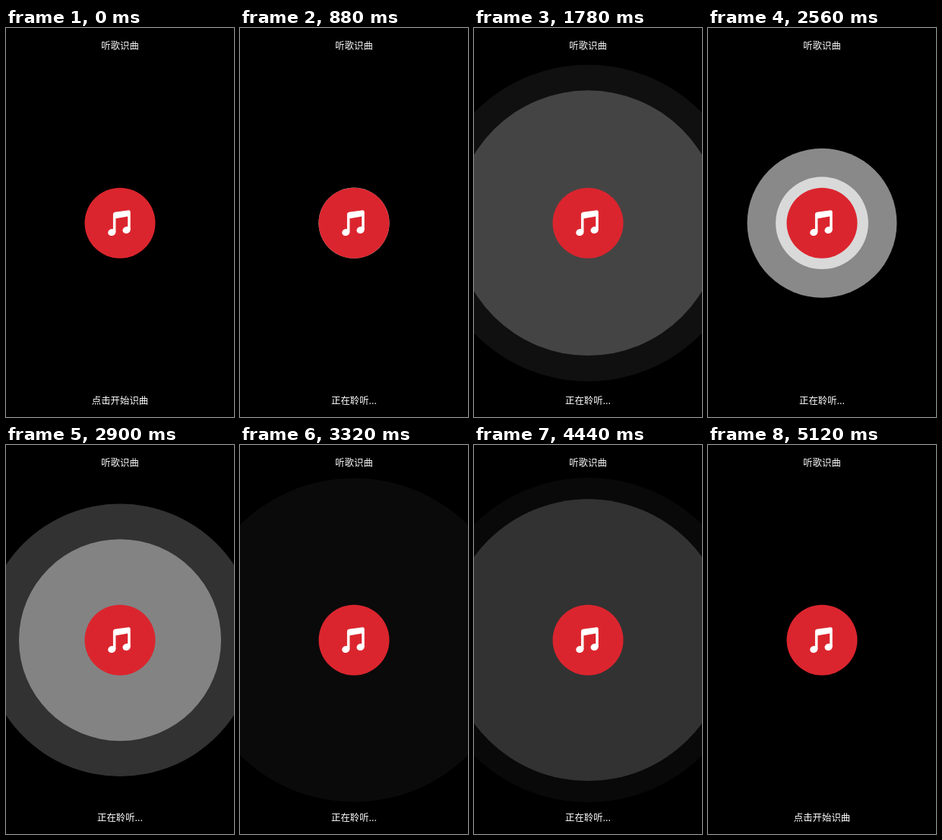
These frames come from a looping animation (300x513 px, 5200 ms). An HTML page with a canvas:

```html
<!DOCTYPE html>
<html lang="zh-CN">
<head>
<meta charset="utf-8">
<style>
  html, body { margin: 0; width: 100%; height: 100%; overflow: hidden; background: #000; }
  #stage { position: relative; width: 300px; height: 513px; overflow: hidden; }
  canvas { position: absolute; left: 0; top: 0; }
  .label {
    position: absolute; left: 0; width: 300px; text-align: center; color: #fff;
    font: 12.4px/20px "Noto Sans CJK SC", "Noto Sans CJK", sans-serif; white-space: nowrap;
  }
  #title { top: 13px; }
  #hint { top: 481px; }
</style>
</head>
<body>
<div id="stage">
  <canvas id="view" width="300" height="513"></canvas>
  <div class="label" id="title">听歌识曲</div>
  <div class="label" id="hint">点击开始识曲</div>
</div>
<script>
  const LOOP = 5200;
  const CX = 150, CY = 257.2;
  const BUTTON = 46.5, REACH = 218.5;
  const GROW = 1080, DELAY = 198;
  const WAVES = [866, 2161, 3473];
  const LISTEN_FROM = 860, LISTEN_TO = 4750;

  const ctx = document.getElementById('view').getContext('2d');
  const hint = document.getElementById('hint');
  const ease = u => 0.5 - Math.cos(Math.PI * u) / 2;

  function disc(r, color) {
    ctx.fillStyle = color;
    ctx.beginPath();
    ctx.arc(CX, CY, r, 0, Math.PI * 2);
    ctx.fill();
  }

  function ripple(age) {
    if (age <= 0 || age >= GROW) return;
    const p = ease(age / GROW);
    const alpha = 0.735 - 0.72 * p + 0.1 * p * (1 - p);
    disc(BUTTON + (REACH - BUTTON) * p, `rgba(255,255,255,${alpha})`);
  }

  function head(x, y) {
    ctx.beginPath();
    ctx.ellipse(x, y, 5.2, 4.5, -0.35, 0, Math.PI * 2);
    ctx.fill();
  }

  const beam = new Path2D(
    'M140.9 269 V246 Q140.9 243.2 143.6 242.7 L160.3 240.4 Q163.7 240 163.7 243.2' +
    ' V266 H160.2 V248.6 L144.4 251.2 V269 Z');

  function note() {
    ctx.fillStyle = '#fff';
    ctx.fill(beam);
    head(139.3, 269.5);
    head(158.6, 266.4);
  }

  function draw(t) {
    ctx.fillStyle = '#000';
    ctx.fillRect(0, 0, 300, 513);
    for (const start of WAVES) {
      ripple(t - start);
      ripple(t - start - DELAY);
    }
    disc(BUTTON, '#db252e');
    note();
    const text = t >= LISTEN_FROM && t < LISTEN_TO ? '正在聆听...' : '点击开始识曲';
    if (hint.textContent !== text) hint.textContent = text;
  }

  function tick() {
    draw(performance.now() % LOOP);
    requestAnimationFrame(tick);
  }
  tick();
</script>
</body>
</html>
```
